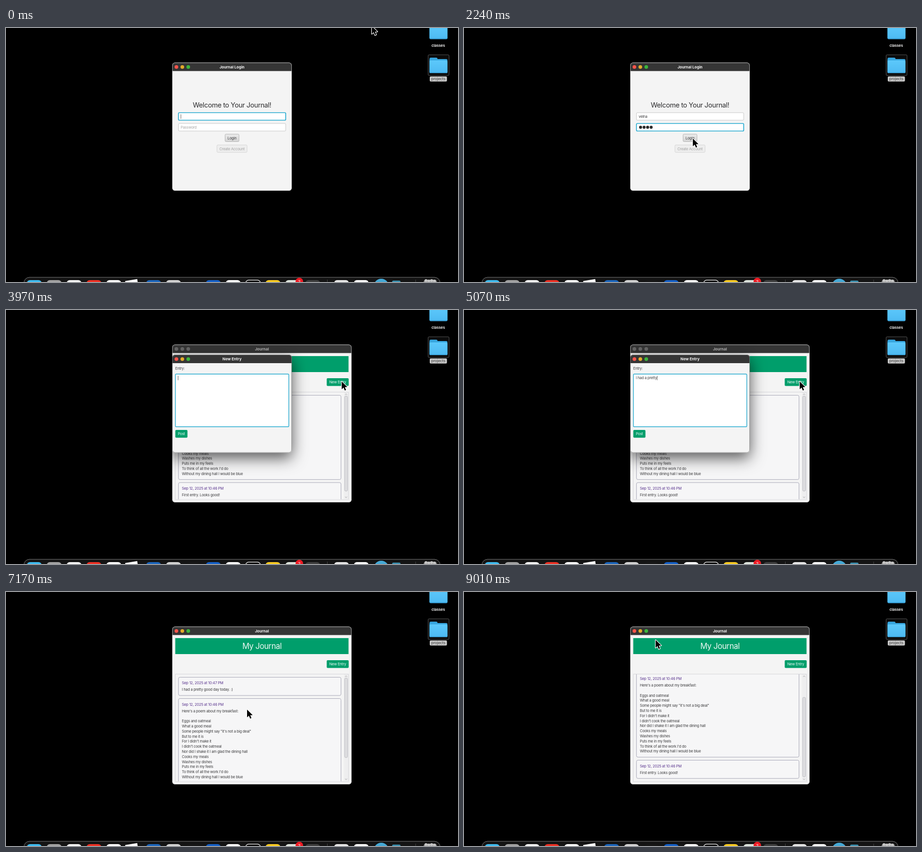
Write an HTML page with a canvas that moves like this. It is 960x540 px and loops after 9.04 s.

```html
<!DOCTYPE html>
<html lang="en">
<head>
<meta charset="utf-8">
<title>Journal</title>
<style>
html, body { margin: 0; width: 100%; height: 100%; overflow: hidden; background: #000; }
canvas { display: block; width: 960px; height: 540px; }
</style>
</head>
<body>
<canvas id="stage" width="960" height="540"></canvas>
<script>
const ctx = document.getElementById('stage').getContext('2d');
const LOOP = 9040;
const FONT = 'Inter, "Liberation Sans", sans-serif';
const PAPER = '#f4f4f4', INK = '#3c3c3e', GREEN = '#009e6b', FOCUS = '#22a9cf';
const USER = 'velna';
const NOTE = 'I had a pretty good day today. :)';
const POEM = ["Here's a poem about my breakfast:", '', 'Eggs and oatmeal', 'What a good meal',
  'Some people might say "it\'s not a big deal"', 'But to me it is', "For I didn't make it",
  "I didn't cook the oatmeal", 'Nor did I shake it I am glad the dining hall', 'Cooks my meals',
  'Washes my dishes', 'Puts me in my feels', "To think of all the work I'd do",
  'Without my dining hall I would be blue'];
const ENTRIES = [
  { date: 'Sep 12, 2025 at 10:47 PM', lines: [NOTE] },
  { date: 'Sep 12, 2025 at 10:46 PM', lines: POEM },
  { date: 'Sep 12, 2025 at 10:46 PM', lines: ['First entry. Looks good!'] }
];
const LINE = 10.8, CARD = 38.7, GAP = 6.5;

// the click comes first, the new window a moment later
const T = { user: 350, pass: 900, journal: 2500, dialog: 3970, note: 4165, posted: 6820, drag: 7865 };
const REST = { from: 5370, to: 5510 };   // pause in the typing
const GRIP = 223.3, TRAVEL = 41, SCROLL = 54.5;

// time, x, y of the pointer tip
const PATH = [
  [0, 777, -4], [800, 530, 205], [1470, 514, 227], [2200, 486, 235], [3040, 486, 235],
  [3420, 674, 187], [3610, 726, 146], [3800, 713, 152], [6410, 713, 152], [6720, 372, 262],
  [6820, 372, 262], [7170, 512, 250], [7600, 726, GRIP], [T.drag, 726, GRIP],
  [8310, 726, 267], [8480, 724, 272], [8620, 724, 272], [9010, 407, 102], [LOOP, 407, 102]
];

const clamp = v => Math.max(0, Math.min(1, v));
const smooth = u => u * u * (3 - 2 * u);

function tipAt(t) {
  const i = Math.max(1, PATH.findIndex(p => p[0] >= t));
  const [t0, x0, y0] = PATH[i - 1], [t1, x1, y1] = PATH[i];
  const u = smooth(clamp((t - t0) / (t1 - t0)));
  return { x: x0 + (x1 - x0) * u, y: y0 + (y1 - y0) * u };
}

function box(x, y, w, h, r, fill, stroke, lw = 1) {
  ctx.beginPath();
  ctx.roundRect(x, y, w, h, r);
  if (fill) { ctx.fillStyle = fill; ctx.fill(); }
  if (stroke) { ctx.strokeStyle = stroke; ctx.lineWidth = lw; ctx.stroke(); }
}

function disc(x, y, r, fill) {
  ctx.beginPath();
  ctx.arc(x, y, r, 0, 7);
  ctx.fillStyle = fill;
  ctx.fill();
}

function text(s, x, y, { size = 7.7, weight = 400, color = INK, align = 'left', track = -0.22 } = {}) {
  ctx.font = `${weight} ${size}px ${FONT}`;
  ctx.letterSpacing = track + 'px';
  ctx.textAlign = align;
  ctx.fillStyle = color;
  ctx.fillText(s, x, y + size * 0.36);
  return ctx.measureText(s).width;
}

function vgrad(y0, y1, a, b) {
  const g = ctx.createLinearGradient(0, y0, 0, y1);
  g.addColorStop(0, a);
  g.addColorStop(1, b);
  return g;
}

function folder(x, y) {
  box(x, y, 17, 10, 3, '#35a3dc');
  box(x, y + 3, 38, 30, 2.5, '#39a8e0');
  box(x, y + 6, 38, 27, 2.5, vgrad(y + 6, y + 33, '#5cc8fb', '#4dbaf2'));
  box(x + 1, y + 31.5, 36, 1.2, 0.6, '#3398cf');
}

function desktop() {
  ctx.fillStyle = '#000';
  ctx.fillRect(0, 0, 960, 540);
  folder(899.5, -9.5);
  text('classes', 918, 37.5, { size: 8, weight: 600, color: '#fff', align: 'center', track: -0.1 });
  box(896.5, 57, 44.5, 44, 2, '#0b0b0b', '#565656');
  folder(899.5, 63);
  box(900, 103, 36.5, 10.8, 2, '#cacaca');
  text('projects', 918.2, 108.5, { size: 8, weight: 500, color: '#4c4c4c', align: 'center', track: -0.1 });
}

function dock() {
  box(38, 530, 884, 40, 12, '#141414', '#7c7c7c');
  const icons = ['#3fbcf0', '#a2a2a2', '#f4f4f4', '#ee3124', '#fff', null, '#1c66bd', '#d4d4d4',
    '#161616', '#1560c8', '#fff', '#080808', '#ffcc22', '#dfe6df', '#3f3f3f'];
  icons.forEach((c, i) => {
    if (c) box(44 + i * 42.25, 536, 32, 32, 7, c, i === 11 ? '#dcdcdc' : null, 1.5);
  });
  ctx.save();
  ctx.translate(253, 538);
  ctx.rotate(-0.16);
  box(0, 0, 26, 26, 0, '#fff');
  ctx.restore();
  disc(623, 539, 8, '#ee1c25');
  text('2', 623, 539, { size: 8, weight: 500, color: '#fff', align: 'center', track: 0 });
  ctx.fillStyle = '#4a4a4a';
  ctx.fillRect(682, 535, 1, 5);
  ctx.fillRect(869.5, 535, 1, 5);
  box(697, 536, 31, 31, 6, '#e8e8e8');
  box(739, 536, 31, 31, 6, '#fff');
  disc(797, 549, 16, '#45a9d6');
  box(820, 537, 18, 20, 3, '#3b8fae');
  box(887, 535, 28, 20, 5, '#8c8c8c');
  for (let i = 0; i < 4; i++) disc(892 + i * 6, 537 + (i % 2), 3, '#c6c6c6');
}

function frame(x, y, w, h, title, active = true, shadow = false) {
  ctx.save();
  if (shadow) {
    ctx.shadowColor = 'rgba(0,0,0,.65)';
    ctx.shadowBlur = 32;
    ctx.shadowOffsetY = 11;
  }
  box(x, y, w, h, 6, PAPER);
  ctx.restore();
  box(x, y, w, 18, [6, 6, 0, 0], '#353535');
  box(x + 0.5, y + 0.5, w - 1, h - 1, 6, null, shadow ? '#858585' : '#c2c2c2', 0.8);
  const lights = active ? ['#f8544a', '#e2aa2a', '#3cb53c'] : ['#666', '#666', '#666'];
  lights.forEach((c, i) => disc(x + 8.9 + i * 12.6, y + 9.3, 3.9, c));
  text(title, x + w / 2, y + 9.2, {
    size: 8, weight: 700, align: 'center', track: 0, color: active ? '#f6f6f6' : '#b6b6b6'
  });
}

function field(y, focused) {
  box(366.3, y, 227.8, 16, 2, '#fff', focused ? FOCUS : '#c6c6c6', focused ? 1.7 : 1);
}

function caret(x, y) {
  ctx.fillStyle = INK;
  ctx.fillRect(x, y - 4.5, 0.8, 9.5);
}

// how many of n characters are typed at t, one every `step` ms
const typed = (t, from, n, step) => Math.max(0, Math.min(n, Math.floor((t - from) / step)));

function login(t) {
  frame(353, 73.5, 254, 272.5, 'Journal Login');
  text('Welcome to Your Journal!', 480, 164.3, { size: 14.4, color: '#2c2c2e', align: 'center', track: -0.35 });
  const onPass = t >= T.pass;
  field(180, !onPass);
  field(203, onPass);
  const w = text(USER.slice(0, typed(t, T.user, USER.length, 90)), 371, 188.2);
  if (onPass) {
    const dots = typed(t, T.pass, 4, 90);
    for (let i = 0; i < dots; i++) disc(375 + i * 7.5, 211, 3.2, '#2a2a2a');
    if (t < 1400) caret(372 + dots * 7.5, 211);
  } else {
    caret(371 + w, 188);
    text('Password', 371, 211, { color: '#a6a6a6' });
  }
  box(465.3, 225.7, 29.6, 15.8, 2, vgrad(225, 242, '#ececec', '#d4d4d4'), '#b4b4b4');
  text('Login', 480, 233.8, { align: 'center' });
  box(448, 248.7, 64, 15.6, 2, '#eeeeee', '#d4d4d4');
  text('Create Account', 480, 256.8, { align: 'center', color: '#a2a2a2' });
}

function arrow(x, y, d) {
  ctx.beginPath();
  ctx.moveTo(x - 2.2, y + d);
  ctx.lineTo(x, y - d);
  ctx.lineTo(x + 2.2, y + d);
  ctx.strokeStyle = '#999';
  ctx.lineWidth = 0.9;
  ctx.stroke();
}

function button(label, x, y, w) {
  box(x, y, w, 16.6, 2, GREEN);
  text(label, x + w / 2, y + 8.3, { align: 'center', color: '#f4faf7' });
}

function journal(t, tip) {
  const posted = t >= T.posted;
  // the thumb follows the pointer until it reaches the end of its track
  const u = t < T.drag ? 0 : t > 8310 ? 1 : clamp((tip.y - GRIP) / TRAVEL);
  frame(353, 73.5, 381, 335.5, 'Journal', t < T.dialog || posted);
  ctx.fillStyle = GREEN;
  ctx.fillRect(359.5, 98, 368, 34);
  text('My Journal', 543.7, 115.5, { size: 16.6, color: '#f0f8f4', align: 'center', track: -0.45 });
  button('New Entry', 681.2, 145, 46.6);

  box(359.5, 174.5, 368, 228.5, 0, PAPER, '#cfcfd4', 0.8);
  ctx.save();
  ctx.beginPath();
  ctx.rect(360, 175, 357, 227.5);
  ctx.clip();
  let y = 181.3 - u * SCROLL;
  for (const e of posted ? ENTRIES : ENTRIES.slice(1)) {
    const h = CARD + (e.lines.length - 1) * LINE;
    box(366.3, y, 345.2, h, 3, '#f6f6f7', '#9c9cae', 0.9);
    text(e.date, 373.5, y + 12.3, { color: '#56308c', track: -0.16 });
    e.lines.forEach((s, i) => text(s, 373.5, y + 26.3 + i * LINE));
    y += h + GAP;
  }
  ctx.restore();

  box(718, 175, 9, 227.5, 0, '#eeeeef');
  arrow(722.3, 179.3, 1);
  arrow(722.3, 398, -1);
  box(719.2, 183 + u * TRAVEL, 6.2, posted ? 169 : 202, 2.5, '#dedee0', '#b6b6bc', 0.9);
}

function dialog(t) {
  ctx.save();
  ctx.beginPath();
  ctx.rect(353, 73.5, 381, 335.5);
  ctx.clip();
  frame(353, 95, 254, 208.5, 'New Entry', true, true);
  ctx.restore();
  text('Entry:', 359.5, 124.5);
  box(359.8, 136.3, 240.8, 112, 1.5, '#fff', FOCUS, 1.4);
  const busy = Math.min(t, REST.from) + Math.max(0, t - REST.to);
  const note = NOTE.slice(0, typed(busy, T.note, NOTE.length, 63));
  caret(365 + text(note, 365, 144.3), 144.3);
  button('Post', 359.6, 255, 25.8);
}

function pointer({ x, y }) {
  ctx.save();
  ctx.translate(x, y);
  ctx.beginPath();
  ctx.moveTo(0, 0);
  ctx.lineTo(0, 16.5);
  ctx.lineTo(3.9, 12.9);
  ctx.lineTo(6.6, 19.3);
  ctx.lineTo(9.3, 18.1);
  ctx.lineTo(6.7, 12);
  ctx.lineTo(11.9, 11.8);
  ctx.closePath();
  ctx.lineJoin = 'round';
  ctx.lineWidth = 2.4;
  ctx.strokeStyle = '#fff';
  ctx.stroke();
  ctx.fillStyle = '#000';
  ctx.fill();
  ctx.restore();
}

function draw(t) {
  const tip = tipAt(t);
  desktop();
  dock();
  if (t < T.journal) login(t);
  else journal(t, tip);
  if (t >= T.dialog && t < T.posted) dialog(t);
  pointer(tip);
}

const start = performance.now();
function tick() {
  draw((performance.now() - start) % LOOP);
  requestAnimationFrame(tick);
}
tick();
</script>
</body>
</html>
```
